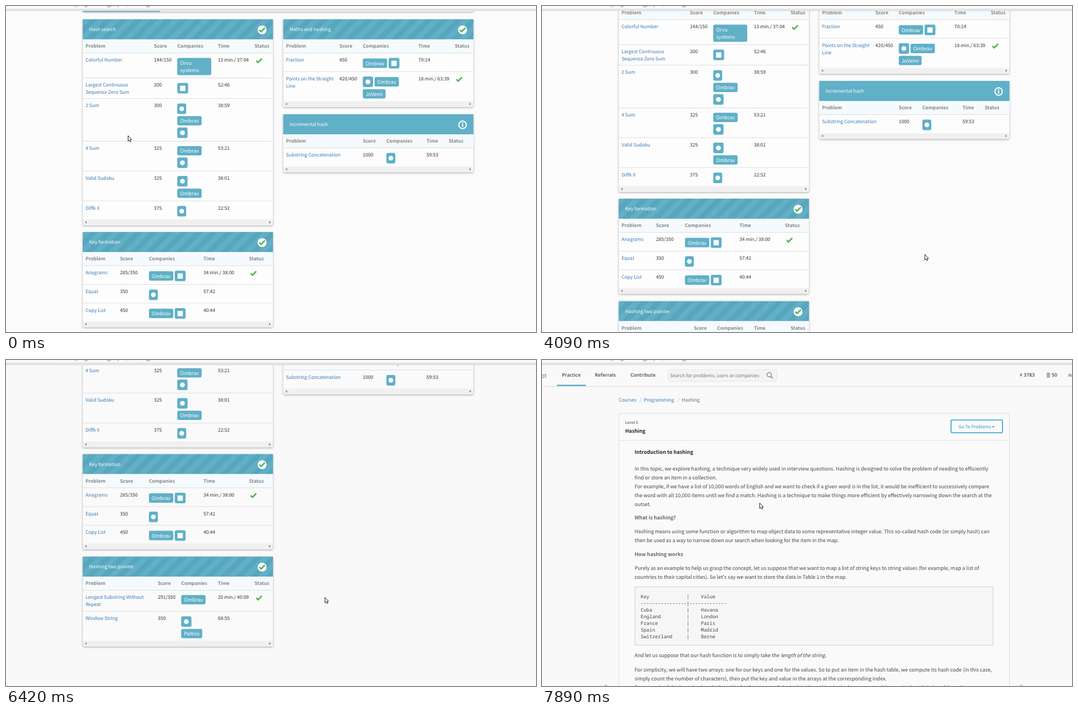
These frames come from a looping animation (953 by 587 pixels, 8000 ms). An HTML page with a canvas:

```html
<!DOCTYPE html>
<html lang="en">
<head>
<meta charset="utf-8">
<title>Hashing course</title>
<style>
html, body { margin: 0; width: 100%; height: 100%; overflow: hidden; background: #fbfbfb; }
canvas { display: block; }
</style>
</head>
<body>
<canvas id="stage" width="953" height="587"></canvas>
<script>
const ctx = document.getElementById('stage').getContext('2d');
ctx.textRendering = 'geometricPrecision';

const LOOP = 8000;
const LIST_TOP = 2000;   // page position of the problem list
const SANS = '"Noto Sans CJK JP", "Noto Sans CJK SC", "Noto Sans CJK KR", "Noto Sans CJK", sans-serif';
const SMALL = '8.5px ' + SANS, BODY = '9.07px ' + SANS;
const NAV = '600 8.7px "Open Sans", sans-serif';
const MONO = '8.6px "Noto Sans Mono", monospace';
const TEAL = '#60b0c7', LINK = '#3878b4', INK = '#444', GREEN = '#54b554';

// Stepped motion: [first change, last change, values spread evenly between]
const cursorMoves = [
  [0, 0, [[219, 233]]],
  [840, 1860, [[112, 258], [104, 194], [202, 85], [335, 88], [467, 88], [467, 33], [458, 20], [450, 60]]],
  [2010, 2560, [[380, 130], [200, 250], [143, 360], [330, 440], [477, 473]]],
  [2860, 3400, [[455, 400], [560, 160], [721, 260], [715, 390], [688, 447]]],
  [4100, 4650, [[660, 470], [620, 505], [590, 525], [576, 536]]],
  [5900, 6020, [[569, 480], [573, 427]]],
  [7740, 7890, [[480, 340], [391, 257]]]
];
const scrollMoves = [
  [0, 0, [2000]],
  [3700, 4650, [2000.7, 2030, 2060, 2067.6, 2095, 2125, 2135.2]],
  [4950, 5070, [2170, 2202]],
  [5220, 5340, [2228, 2236.5]],
  [5620, 5620, [2237.5]],
  [6420, 7320, [2237.5, 2043, 1710, 1377, 1044, 711, 378, 45]],
  [7470, 7470, [0]]
];

function valueAt(moves, t) {
  const [start, end, values] = moves.filter(m => m[0] <= t).pop();
  const last = values.length - 1;
  return values[Math.min(last, Math.floor((t - start) / (end - start || 1) * last))];
}

// Tags: f, g and w are icon tiles, everything else is a label
const check = true;
const cards = [
  { x: 138, y: 24, title: 'Hash search', cols: [143, 266, 308, 381, 447], rows: [
    [45, 'Colorful Number', '144/150', '13 min./ 37:04', [['Orvu\nsystems']], check],
    [37, 'Largest Continuous\nSequence Zero Sum', '200', '52:46', [['w']]],
    [77, '2 Sum', '300', '38:59', [['f'], ['Ombrav'], ['g']]],
    [53.5, '4 Sum', '325', '53:21', [['Ombrav'], ['g']]],
    [54, 'Valid Sudoku', '325', '38:01', [['g'], ['Ombrav']]],
    [34, 'Diffk II', '375', '22:52', [['f']]]] },
  { x: 138, y: 407, title: 'Key formation', cols: [143, 205, 257, 355, 437], rows: [
    [34, 'Anagrams', '285/350', '34 min./ 38:00', [['Ombrav', 'w']], check],
    [33.5, 'Equal', '350', '57:42', [['f']]],
    [33.5, 'Copy List', '450', '40:44', [['Ombrav', 'w']]]] },
  { x: 138, y: 591.5, title: 'Hashing two pointer', cols: [143, 273, 315, 381, 447], rows: [
    [38, 'Longest Substring Without\nRepeat', '291/350', '20 min./ 40:09', [['Ombrav']], check],
    [53.5, 'Window String', '350', '68:55', [['g'], ['Peltiro']]]] },
  { x: 498.5, y: 24, title: 'Maths and hashing', cols: [503.5, 599.5, 641.5, 741.5, 807], rows: [
    [33.5, 'Fraction', '450', '70:14', [['Ombrav', 'w']]],
    [54, 'Points on the Straight\nLine', '420/450', '18 min./ 63:39', [['g', 'Ombrav'], ['JoVemi']], check]] },
  { x: 498.5, y: 195, title: 'Incremental hash', plain: true, cols: [503.5, 641.5, 684, 756, 796], rows: [
    [34, 'Substring Concatenation', '1000', '59:53', [['f']]]] }
];

const intro = `In this topic, we explore hashing, a technique very widely used in interview questions. Hashing is designed to solve the problem of needing to efficiently
find or store an item in a collection.
For example, if we have a list of 10,000 words of English and we want to check if a given word is in the list, it would be inefficient to successively compare
the word with all 10,000 items until we find a match. Hashing is a technique to make things more efficient by effectively narrowing down the search at the
outset.`;
const meaning = `Hashing means using some function or algorithm to map object data to some representative integer value. This so-called hash code (or simply hash) can
then be used as a way to narrow down our search when looking for the item in the map.`;
const example = `Purely as an example to help us grasp the concept, let us suppose that we want to map a list of string keys to string values (for example, map a list of
countries to their capital cities). So let's say we want to store the data in Table 1 in the map.`;
const arrays = `For simplicity, we will have two arrays: one for our keys and one for the values. So to put an item in the hash table, we compute its hash code (in this case,
simply count the number of characters), then put the key and value in the arrays at the corresponding index.
For example, Cuba has a hash code (length) of 4. So we store Cuba in the 4th position in the keys array, and Havana in the 4th index of the values array
etc. And we end up with the following:`;
const verdict = `Now, in this specific example things work quite well. Our array needs to be big enough to accommodate the longest string, but in this case that's only 11
slots. And we do waste a bit of space because, for example, there's no 1-letter keys in our data, nor keys between 8 and 10 letters. But in this case, the
waste isn't so bad either. And taking the length of a string is nice and fast, so so is the process of finding the value associated with a given key (certainly
faster than doing up to five string comparisons)1.`;
const limits = `We can also easily see that this method would not work for storing arbitrary strings. If one of our string keys was a thousand characters in length but the
rest were small, we would waste the majority of the space in the arrays. More seriously, this model can't deal with collisions: that is, what to do when
there is more than one key with the same hash code (in this case, more than one string of a given length). For example, if our keys were random words of
English, taking the string length would be fairly useless. Granted, the word "psuedoantidisestablishmentarianistically" would probably get its own place
in the array. But on the other hand, we'd be left with thousands of other words that all have the same lengths.`;

const capitals = { Cuba: 'Havana', England: 'London', France: 'Paris', Spain: 'Madrid', Switzerland: 'Berne' };
const dashes = (...counts) => counts.map(n => '-'.repeat(n)).join('|');
const capitalTable = ['Key'.padEnd(16) + '|    Value', dashes(16, 13),
  ...Object.entries(capitals).map(([k, v]) => k.padEnd(16) + '|    ' + v)].join('\n');
const hashRow = (a, b, c) => a.padEnd(21) + '|' + b.padEnd(18) + '|' + c;
const keyAt = { 4: 'Cuba', 5: 'Spain', 6: 'France', 7: 'England', 11: 'Switzerland' };
const hashTable = [hashRow('Position', '   Keys array', '  Values array'),
  hashRow('(hash = key length)', '', ''), dashes(21, 18, 15),
  ...Array.from({ length: 11 }, (_, i) => {
    const key = keyAt[i + 1] || '';
    return hashRow('   ' + (i + 1), (i < 10 ? '    ' : '  ') + key, '    ' + (capitals[key] || ''));
  })].join('\n');

// y is the middle of the capitals on the first line
function text(str, x, y, color = INK, font = SMALL, leading = 13.2) {
  ctx.font = font;
  ctx.fillStyle = color;
  str.split('\n').forEach((line, i) => ctx.fillText(line, x, y + 3.2 + i * leading));
}
const bold = (str, x, y, color, font = SMALL) => text(str, x, y, color, 'bold ' + font);
const para = (str, y) => text(str, 166.5, y, INK, BODY, 15.83);

function rect(x, y, w, h, color) {
  ctx.fillStyle = color;
  ctx.fillRect(x, y, w, h);
}
function box(x, y, w, h, r, fill, stroke, lineWidth = 1) {
  ctx.beginPath();
  ctx.roundRect(x, y, w, h, r);
  ctx.fillStyle = fill;
  ctx.fill();
  if (stroke) { ctx.strokeStyle = stroke; ctx.lineWidth = lineWidth; ctx.stroke(); }
}
function poly(points, x, y, fill) {
  ctx.beginPath();
  points.forEach(([px, py]) => ctx.lineTo(x + px, y + py));
  if (fill) { ctx.closePath(); ctx.fillStyle = fill; ctx.fill(); }
}
function line(points, x, y, color, width) {
  poly(points, x, y);
  ctx.strokeStyle = color;
  ctx.lineWidth = width;
  ctx.stroke();
}
function disc(x, y, r, color) {
  ctx.beginPath();
  ctx.arc(x, y, r, 0, 7);
  ctx.fillStyle = color;
  ctx.fill();
}
function ring(x, y, r, color, width) {
  ctx.beginPath();
  ctx.arc(x, y, r, 0, 7);
  ctx.strokeStyle = color;
  ctx.lineWidth = width;
  ctx.stroke();
}
const tick = (x, y) => line([[-5, 0], [-1.8, 3.2], [5, -3.8]], x, y, GREEN, 2.7);

function raised(x, y, w, h, fill) {
  ctx.save();
  ctx.shadowColor = 'rgba(0,0,0,.35)';
  ctx.shadowBlur = 3.5;
  ctx.shadowOffsetY = 1;
  box(x, y, w, h, 2, fill);
  ctx.restore();
}

// Draws one tag centred on y and returns its width
function tag(name, x, y) {
  const tileWidth = { f: 16, g: 18.5, w: 19.5 }[name];
  if (tileWidth) {
    box(x, y - 9.5, tileWidth, 19, 3, TEAL);
    if (name === 'w') rect(x + 5, y - 4.5, 9.5, 9.5, '#fff');
    else disc(x + tileWidth / 2, y, 4.3, '#fff');
    return tileWidth;
  }
  const wrapped = name.includes('\n');
  ctx.font = BODY;
  const width = wrapped ? 61 : ctx.measureText(name).width + 10;
  const height = wrapped ? 31 : 16.8;
  box(x, y - height / 2, width, height, 3, TEAL);
  text(name, x + 5, wrapped ? y - 6.5 : y + .3, '#fff', BODY, 13.7);
  return width;
}

function tags(lines, x, top) {
  let y = top + (lines[0][0].includes('\n') ? 25 : lines[0].some(n => n.length === 1) ? 19 : 17.7);
  for (const names of lines) {
    let left = x;
    for (const name of names) left += tag(name, left, y) + 2.6;
    y += 21.6;
  }
}

function stripes(x, y, w, h) {
  const period = 27;
  ctx.save();
  ctx.beginPath();
  ctx.rect(x, y, w, h);
  ctx.clip();
  for (let k = 0; k < w + h; k += period)
    poly([[k + period / 2, 0], [k + period, 0], [k + period - h, h], [k + period / 2 - h, h]], x, y, 'rgba(0,40,60,.075)');
  ctx.restore();
}

function drawCard({ x, y, title, plain, cols, rows }, fill) {
  const w = 342;
  const bodyHeight = rows.reduce((sum, row) => sum + row[0], 0);
  raised(x, y, w, bodyHeight + 70.5, fill);
  rect(x, y, w, 36, TEAL);
  if (!plain) stripes(x, y, w, 36);
  text(title, x + 11.5, y + 18, '#fff');
  const ix = x + 322.5, iy = y + 19;
  if (plain) {
    ring(ix, iy, 6.7, '#fff', 2);
    rect(ix - 1.2, iy - 4, 2.4, 2, '#fff');
    rect(ix - 1.2, iy - 1, 2.4, 4.6, '#fff');
  } else {
    disc(ix, iy, 8, '#fff');
    tick(ix, iy);
  }
  rect(x, y + 36, w, 24, '#f5fafe');
  ['Problem', 'Score', 'Companies', 'Time', 'Status'].forEach((label, i) => bold(label, cols[i], y + 48, '#858585'));

  let top = y + 60;
  for (const [height, problem, score, time, tagLines, done] of rows) {
    rect(x, top, w, 1, '#ddd');
    text(problem, cols[0], top + 13, LINK);
    text(score, cols[1], top + 13, '#333');
    tags(tagLines, cols[2], top);
    text(time, cols[3], top + 13, '#333');
    if (done) tick(cols[4] + 8, top + 14.5);
    top += height;
  }
  rect(x, top, w, 10, '#f0f0f0');
  poly([[2, -2.2], [2, 2.2], [-1.2, 0]], x + 5, top + 5, '#888');
  poly([[-2, -2.2], [-2, 2.2], [1.2, 0]], x + w - 5, top + 5, '#888');
}

function drawList(fill) {
  raised(138, -40, 702, 50.5, fill);
  rect(138, 8.5, 139, 2.2, TEAL);
  cards.forEach(card => drawCard(card, fill));
}

function drawNav() {
  rect(0, 47, 953, 1, '#ddd');
  text('ot', -2, 29, '#777', '11px ' + SANS);
  text('Practice', 36, 27, INK, NAV);
  text('Referrals', 95, 27, INK, NAV);
  text('Contribute', 159, 27, INK, NAV);
  rect(27, 44.5, 52, 2.5, TEAL);
  box(227, 17.5, 195, 21, 2, '#f4f4f4', '#e6e6e6');
  text('Search for problems, users or companies', 230, 28, '#777');
  ring(408.5, 26.5, 4, '#888', 1.5);
  line([[0, 0], [3.5, 3.5]], 411.5, 29.5, '#888', 1.8);
  poly([[1, -5], [-2, 1], [0, 1], [-1, 5], [2.5, -1.5], [.5, -1.5]], 861, 27, '#777');
  text('3783', 866, 27, INK, NAV);
  for (let i = 0; i < 4; i++) rect(907.5, 23 + i * 2.3, 6, 1.5, '#888');
  text('50', 916.5, 27, INK, NAV);
  text('na', 946.5, 27, INK, NAV);
}

function codeBox(str, top, height) {
  box(167, top, 644, height, 1, '#f6f6f6', '#ccc');
  text(str, 177.5, top + 17, INK, MONO, 12);
}

function drawArticle(fill) {
  drawNav();
  [['Courses', 138, LINK], ['/', 175.5, '#aaa'], ['Programming', 183, LINK], ['/', 243.5, '#aaa'], ['Hashing', 251, '#666']]
    .forEach(([label, x, color]) => text(label, x, 72, color));

  box(138, 96, 702.5, 1824, 2, fill, '#dcdcdc');
  bold('Level 5', 149.5, 111.5, '#777', '6.8px ' + SANS);
  bold('Hashing', 149.5, 127.5, '#222', BODY);
  box(735.5, 108, 92.5, 23, 2, fill, '#2a9fca', 1.6);
  text('Go To Problems', 749, 119.5, '#2a9fca', '8px ' + SANS);
  poly([[-2.5, -1], [2.5, -1], [0, 1.7]], 811.5, 120, '#2a9fca');
  rect(138, 144, 702, 1, '#e0e0e0');

  bold('Introduction to hashing', 166.5, 166, '#222', BODY);
  para(intro, 196);
  bold('What is hashing?', 166.5, 284, '#666', BODY);
  para(meaning, 309);
  bold('How hashing works', 166.5, 350, '#666', BODY);
  para(example, 375);
  codeBox(capitalTable, 408.5, 105);
  const lead = 'And let us suppose that our hash function is to simply take the ';
  para(lead, 532);
  text('length of the string.', 166.5 + ctx.measureText(lead).width, 532, INK, 'italic ' + BODY);
  para(arrays, 558);
  codeBox(hashTable, 623.5, 188.5);
  para(verdict, 831);
  para(limits, 904);
  // Running text passed over during the fast scroll
  for (let y = 993; y < 1850; y += 162) {
    para(verdict, y);
    para(limits, y + 73);
  }
  line([[3.5, -7], [-3.5, 0], [3.5, 7]], 113, 592, '#ccc', 4.5);
  line([[-3.5, -7], [3.5, 0], [-3.5, 7]], 864, 592, '#ccc', 4.5);
}

function drawBrowserEdge(background) {
  rect(0, 0, 953, 9, background);
  ctx.textAlign = 'right';
  text('courses/programming/topics/hashing/', 262, -3.6, '#777', '9.6px ' + SANS);
  ctx.textAlign = 'left';
  rect(0, 5.5, 953, 1, '#bbb');
  rect(0, 8, 953, 1, '#ccc');
}

function drawCursor([x, y]) {
  const arrow = [[.5, .5], [.5, 10.3], [2.7, 8.3], [4.3, 11.6], [5.8, 10.9], [4.3, 7.7], [7, 7.5]];
  poly(arrow, x, y, '#fff');
  ctx.closePath();
  ctx.strokeStyle = '#222';
  ctx.lineWidth = 1;
  ctx.stroke();
}

function draw(now) {
  const t = now % LOOP;
  const scroll = valueAt(scrollMoves, t);
  const dimmed = t >= 6420;
  const background = dimmed ? '#f9f9f9' : '#fbfbfb';
  const fill = dimmed ? '#fafafa' : '#fdfdfd';
  rect(0, 0, 953, 587, background);
  ctx.save();
  ctx.translate(0, -scroll);
  if (scroll < 1950) drawArticle(fill);
  if (scroll > LIST_TOP - 650) {
    ctx.translate(0, LIST_TOP);
    drawList(fill);
  }
  ctx.restore();
  drawBrowserEdge(background);
  drawCursor(valueAt(cursorMoves, t));
  requestAnimationFrame(() => draw(performance.now()));
}
draw(performance.now());
</script>
</body>
</html>
```
